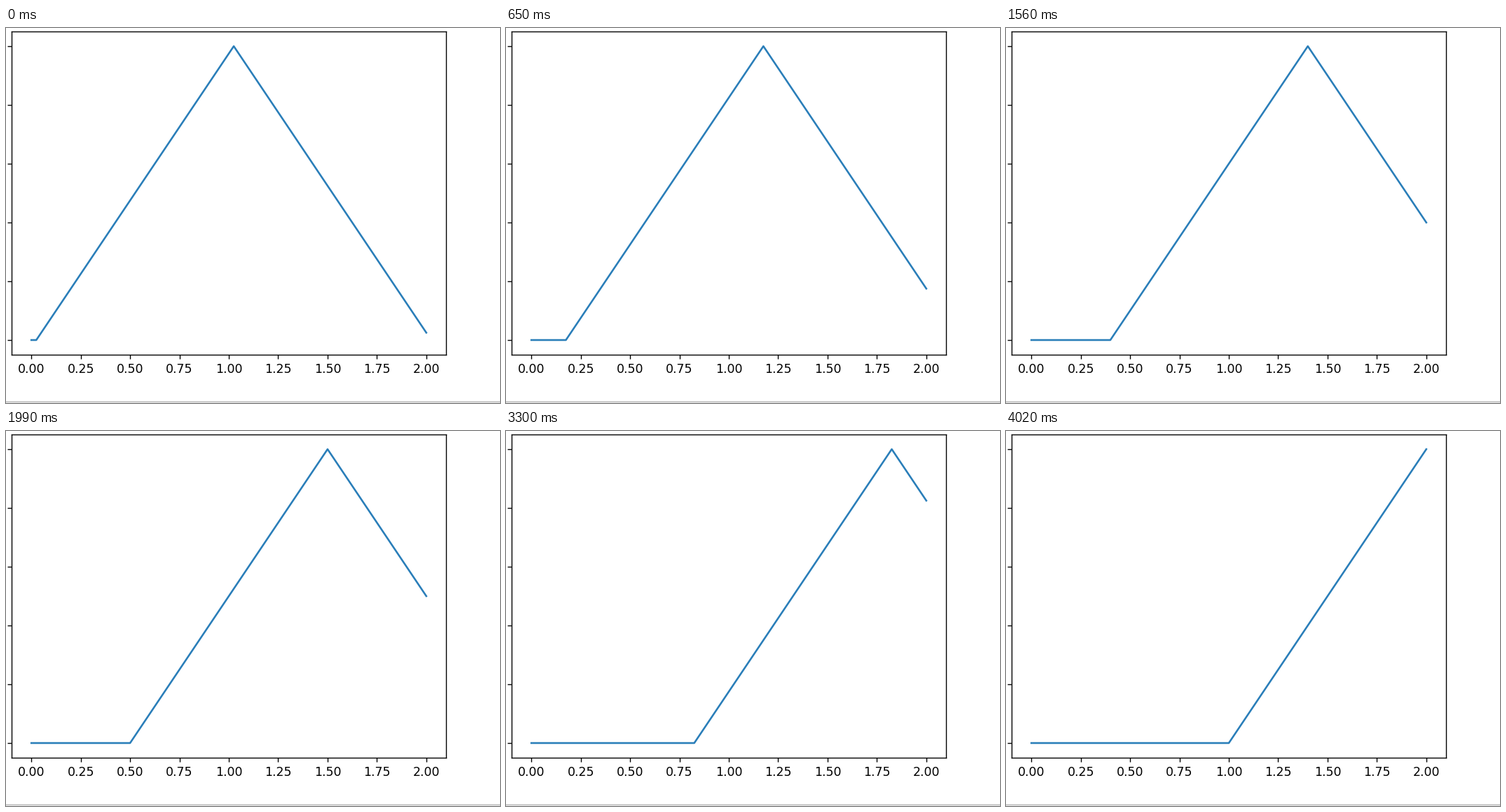
These frames come from a looping animation (705x536 px, 4.46 s). A matplotlib script:

```python
import numpy as np
import matplotlib.pyplot as plt
from matplotlib.animation import FuncAnimation
from matplotlib.patches import Rectangle

W, H, DPI = 705, 536, 125
LOOP_MS, TICK_MS = 4460, 20
STEP_MS, LAST_STEP = 103, 39
SHIFT = 0.025

# Plot area in stage pixels, y counted from the top
LEFT, TOP, RIGHT, BOTTOM = 8, 5, 628, 467

fig = plt.figure(figsize=(W / DPI, H / DPI), dpi=DPI, facecolor="white")
ax = fig.add_axes([LEFT / W, 1 - BOTTOM / H,
                   (RIGHT - LEFT) / W, (BOTTOM - TOP) / H])
ax.set_xlim(-0.1, 2.1)
ax.set_ylim(-0.05, 1.05)
ax.set_xticks(np.linspace(0, 2, 9))
ax.set_yticks(np.linspace(0, 1, 6))
ax.tick_params(labelleft=False, labelsize=10, labelfontfamily="DejaVu Sans")

curve, = ax.plot([], [], color="#2a7eb9", lw=1.5)

# Window edge along the bottom, one pixel row per shade
for row, shade in enumerate(["#f0f0f0", "#b4b4b4", "#e6e6e6"]):
    fig.add_artist(Rectangle((0, row / H), 1, 1 / H, facecolor=shade, lw=0))


def update(frame):
    """Slide the triangle pulse right in equal steps, then hold."""
    step = min(frame * TICK_MS // STEP_MS, LAST_STEP)
    start = SHIFT * (step + 1)
    curve.set_data([0, start, start + 1, 2], [0, 0, 1, start])
    return curve,


anim = FuncAnimation(fig, update, frames=LOOP_MS // TICK_MS,
                     interval=TICK_MS, repeat=True, repeat_delay=0)
plt.show()
```
